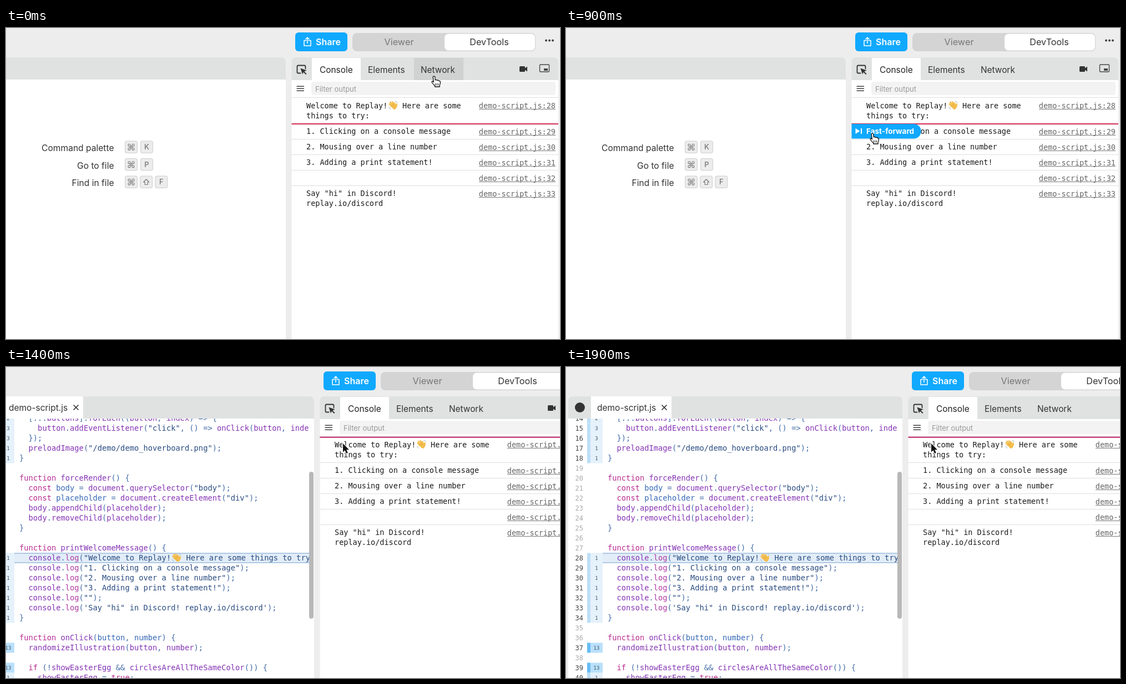
An HTML page with a canvas that plays this animation: 998 px wide and 561 px high, repeating every 2000 ms.

```html
<!DOCTYPE html>
<html lang="en">
<head>
<meta charset="utf-8">
<title>Console rewind</title>
<style>
html, body { margin: 0; width: 100%; height: 100%; overflow: hidden; background: #ededed; }
canvas { display: block; width: 998px; height: 561px; }
</style>
</head>
<body>
<canvas id="stage" width="998" height="561"></canvas>
<script>
const ctx = document.getElementById("stage").getContext("2d");
const LOOP = 2000, STEP = 100, JUMP = 1300;
const SANS = "Inter, 'Open Sans', sans-serif";
const MONO = "'DejaVu Sans Mono', 'Noto Sans Mono', monospace";
const BLUE = "#10a9ff", BAR = "#e0e2e2", LINE = "#dcdedf";

// Pointer tip at each step
const path = [
  [771, 87], [768, 132], [748, 225], [730, 293], [722, 306], [664, 274], [575, 237],
  [535, 219], [546, 212], [552, 190], [555, 163], [556, 146], [556, 139]
];
const pan = [1, 51, 100.5, 101, 101.5, 101.5, 102];

const rows = [
  { y: 126, no: 28, text: ["Welcome to Replay!👋 Here are some", "things to try:"] },
  { y: 173, no: 29, text: ["1. Clicking on a console message"] },
  { y: 201, no: 30, text: ["2. Mousing over a line number"] },
  { y: 229, no: 31, text: ["3. Adding a print statement!"] },
  { y: 257, no: 32, text: [] },
  { y: 285, no: 33, text: ['Say "hi" in Discord!', "replay.io/discord"] }
];

const code = `  [...buttons].forEach((button, index) => {
    button.addEventListener("click", () => onClick(button, index));
  });
  preloadImage("/demo/demo_hoverboard.png");
}

function forceRender() {
  const body = document.querySelector("body");
  const placeholder = document.createElement("div");
  body.appendChild(placeholder);
  body.removeChild(placeholder);
}

function printWelcomeMessage() {
  console.log("Welcome to Replay!👋 Here are some things to try:");
  console.log("1. Clicking on a console message");
  console.log("2. Mousing over a line number");
  console.log("3. Adding a print statement!");
  console.log("");
  console.log('Say "hi" in Discord! replay.io/discord');
}

function onClick(button, number) {
  randomizeIllustration(button, number);

  if (!showEasterEgg && circlesAreAllTheSameColor()) {
    showEasterEgg = true;`.split("\n");

function hits(no) {
  if (no === 14) return 2;
  if (no === 15 || no === 16) return 3;
  if (no === 37 || no === 39) return 13;
  return no < 19 || (no > 27 && no < 35) || no === 40 ? 1 : 0;
}

function rect(x, y, w, h, color) {
  ctx.fillStyle = color;
  ctx.fillRect(x, y, w, h);
}

function round(x, y, w, h, r, color) {
  ctx.beginPath();
  ctx.roundRect(x, y, w, h, r);
  ctx.fillStyle = color;
  ctx.fill();
}

function shape(d, x, y, fill, stroke, width = 1) {
  const p = new Path2D(d);
  ctx.save();
  ctx.translate(x, y);
  ctx.lineJoin = ctx.lineCap = "round";
  ctx.lineWidth = width;
  if (fill) { ctx.fillStyle = fill; ctx.fill(p); }
  if (stroke) { ctx.strokeStyle = stroke; ctx.stroke(p); }
  ctx.restore();
}

function label(str, x, y, size, color, weight = 400, align = "left", family = SANS) {
  ctx.font = `${weight} ${size}px ${family}`;
  ctx.textAlign = align;
  ctx.fillStyle = color;
  ctx.fillText(str, x, y);
}

function wave(x, y) {
  shape("M6 11 L2.5 6.5 M8 9 L4 3.5 M10.5 8 L7.5 2.8 M12.5 8.5 L11 4.5 M13.5 13 Q16 10 15.2 6.8",
    x, y, null, "#f3bd4d", 2.7);
  shape("M5 10 L12.5 6.5 L15 10 Q16 15 12 16.5 Q9 17 5 10Z", x, y, "#f3bd4d");
  shape("M6.2 8.5 L8 10.5 M8.6 7.2 L10 9.2", x, y, null, "#d8942f", .7);
  shape("M1.5 12 Q2 15 4.5 16 M13.2 1.5 Q16 2 16.8 4.5", x, y, null, "#9db4c0", 1);
}

// Draws monospaced text with the waving hand inline; returns the end x
function mono(str, x, y, size, color) {
  str.split("👋").forEach((part, i) => {
    if (i) {
      wave(x + 1, y - 14);
      x += size * 1.38;
    }
    label(part, x, y, size, color, 400, "left", MONO);
    x += ctx.measureText(part).width;
  });
  return x;
}

function drawCodeLine(text, x, y) {
  const token = /("[^"]*"|'[^']*')|\b(function|const|if|true)\b|(\w+)|([^\w"']+)/g;
  const isDecl = text.startsWith("function");
  let before = "", open = false;
  for (const [s, str, key, name] of text.matchAll(token)) {
    let color = "#426ca8";
    if (str) color = "#294b80";
    else if (key) color = "#b92b91";
    else if (name) {
      color = before.trim() === "const" || (isDecl && open) ? "#3568b5" : "#8534b4";
      if (name === "log") color = "#b13ba5";
    }
    x = mono(s, x, y, 13.75, color);
    if (s.trim()) before = s;
    open = open || s.includes("(");
  }
}

function drawEditor() {
  round(-98, 53, 602, 520, 8, BAR);
  rect(-98, 93, 602, 468, "#fff");
  ctx.beginPath();
  ctx.arc(-77, 73, 9, 0, 7);
  ctx.fillStyle = "#333";
  ctx.fill();
  rect(-57, 53, 145, 41, "#fff");
  label("demo-script.js", -46, 78.5, 15.5, "#333");
  shape("M0 0 L8 8 M8 0 L0 8", 71, 69, null, "#333", 1.7);

  ctx.save();
  ctx.beginPath();
  ctx.rect(-98, 93, 593, 468);
  ctx.clip();
  code.forEach((text, i) => {
    const no = 14 + i, mid = 92.5 + i * 18, n = hits(no);
    label(no, -71, mid + 4.5, 12, n ? "#444" : "#aaa", 400, "right", MONO);
    if (n) {
      const hot = n > 9;
      rect(-64, mid - 9, 6, 18, hot ? "#67bcf4" : "#bcdff7");
      rect(-58, mid - 9, 22, 18, hot ? "#b9e0fb" : "#e5f1fb");
      label(n, -47, mid + 3, 9, "#456", 400, "center", MONO);
    }
    if (no === 28) {
      rect(-36, mid - 9, 531, 18, "#e2edf8");
      rect(-36, mid - 9, 531, 1, "#78a3d1");
      rect(-36, mid + 8, 531, 1, "#78a3d1");
    }
    drawCodeLine(text, -27, mid + 4.5);
  });
  ctx.restore();
  round(495, 189, 8, 265, 4, "#b8b8b8");
}

function keyCap(x, y, key) {
  round(x, y, 23, 22.5, 4, "#cfcfcf");
  round(x + 1, y + 1, 21, 20.5, 3, "#ececec");
  if (key === "cmd") {
    shape("M4 4 H7 V7 H4Z M4 4 H2 A2 2 0 1 1 4 2Z M7 4 V2 A2 2 0 1 1 9 4Z M7 7 H9 A2 2 0 1 1 7 9Z M4 7 V9 A2 2 0 1 1 2 7Z",
      x + 6, y + 5.7, null, "#777", 1.1);
  } else if (key === "shift") {
    shape("M5 0 L10 5 H7.5 V9.5 H2.5 V5 H0Z", x + 6.5, y + 6.5, null, "#777", 1.2);
  } else {
    label(key, x + 11.5, y + 15.5, 13, "#777", 500, "center");
  }
}

function drawPalette() {
  round(-98, 53, 602, 520, 8, BAR);
  rect(-98, 93, 602, 468, "#fff");
  [["Command palette", "cmd", "K"], ["Go to file", "cmd", "P"], ["Find in file", "cmd", "shift", "F"]]
    .forEach(([name, ...keys], i) => {
      const y = 203.5 + i * 31.5;
      label(name, 194.5, y + 18.5, 15.6, "#333", 400, "right");
      keys.forEach((k, j) => keyCap(214 + j * (keys.length > 2 ? 27.2 : 28), y, k));
    });
}

function drawHeader() {
  round(521, 8, 94, 34, 6, BLUE);
  shape("M4 5.5 H0 V15 H12 V5.5 H8 M6 10.5 V0 M3 3 L6 0 L9 3", 537, 17, null, "#fff", 1.5);
  label("Share", 558, 30.5, 16, "#fff", 600);
  round(624, 9, 330, 33, 8, "#d4d4d4");
  round(790, 10.5, 163, 30, 7, "#fff");
  label("Viewer", 708, 31, 16.3, "#777", 400, "center");
  label("DevTools", 870.5, 31, 16.2, "#333", 400, "center");
  for (let i = 0; i < 3; i++) round(971 + i * 6, 20.5, 4, 4, 2, "#444");
}

function drawTabs(hoverNetwork) {
  round(514.5, 53, 480.5, 520, 8, BAR);
  rect(514.5, 94, 480.5, 467, "#fff");
  rect(551, 54, 88, 40, "#fff");
  if (hoverNetwork) rect(735, 54, 89, 40, "#d0d2d2");
  shape("M6 14 H2 Q0 14 0 12 V2 Q0 0 2 0 H13 Q15 0 15 2 V6", 524.5, 67.5, null, "#333", 1.8);
  shape("M0 0 L11 4 L6.8 6 L11 10 L9.5 11.5 L5.3 7.3 L3.5 11Z", 530.5, 72.5, "#333");
  label("Console", 565, 80.5, 15.4, "#222");
  label("Elements", 652, 80.5, 15.4, "#333");
  label("Network", 747, 80.5, 15.4, "#333");
  round(925, 69, 10, 10, 1.5, "#333");
  shape("M0 3 L4 0 V9 L0 6Z", 935, 69.5, "#333");
  shape("M1.5 0 H15.5 Q17 0 17 1.5 V11.5 Q17 13 15.5 13 H1.5 Q0 13 0 11.5 V1.5 Q0 0 1.5 0Z",
    961.5, 66, null, "#444", 1.4);
  rect(969, 73, 7, 4, "#444");

  for (let i = 0; i < 3; i++) rect(523.5, 104.5 + i * 4, 13.5, 1.4, "#333");
  round(550, 97, 440, 24, 4, "#f3f3f3");
  label("Filter output", 557, 114.5, 13, "#999");
  rect(514.5, 125, 480.5, 1, LINE);
}

function drawRows(rewound) {
  rows.forEach((row, i) => {
    if (i) rect(514.5, row.y - 1, 480.5, 1, LINE);
    row.text.forEach((s, j) => mono(s, 541, row.y + 18.5 + j * 18 - (i ? .5 : 0), 13.5, "#1c1c1c"));
    const base = row.y + 18.5;
    label("demo-script.js:" + row.no, 990, base, 13.5, "#666", 400, "right", MONO);
    rect(852, base + 1.5, 138, 1, "#777");
  });
  if (rewound) rect(514.5, 125.5, 480.5, 2.5, "#c9497f");
  else rect(514.5, 172, 480.5, 2, "#d32f55");
}

function drawSeek(row, open) {
  const back = row === rows[0];
  const text = back ? "Rewind" : "Fast-forward";
  ctx.font = `700 13.5px ${SANS}`;
  const w = open ? 39 + ctx.measureText(text).width : 26.5;
  round(514.5, row.y, w, 26.5, [0, 13, 13, 0], BLUE);
  const tri = back ? "M11 0 V10 L3.5 5Z" : "M0 0 V10 L8 5Z";
  shape(tri, 521.5, row.y + 8, "#fff");
  rect(back ? 521.5 : 531, row.y + 8, 2, 10, "#fff");
  if (open) label(text, 541, row.y + 18, 13.5, "#fff", 700);
}

function drawPointer(x, y, hand) {
  if (hand) {
    shape("M-1.8 1.5 Q-1.6 -.2 0 0 Q1.6 0 1.8 1.6 L2.3 7 Q4.5 5.4 5.5 7.5 Q7.6 6.4 8.6 8.5 Q11 7.8 11.4 10.2 Q11.8 13 10.2 16 V19 H1.6 V17.2 Q-1.4 14.6 -3.8 11 Q-4.3 9 -2.6 9 Q-1.4 9.3 -.6 10.7Z",
      x, y, "#fff", "#111", 1.3);
    shape("M2.4 13 V16.4 M5 13 V16.4 M7.6 13 V16.4", x, y, null, "#222", 1);
  } else {
    shape("M0 0 V15.5 L3.5 12.3 L6 18 L8.8 16.8 L6.3 11.3 H11Z", x, y, "#111", "#fff", 2);
    shape("M0 0 V15.5 L3.5 12.3 L6 18 L8.8 16.8 L6.3 11.3 H11Z", x, y, "#111");
  }
}

function draw(now) {
  const step = Math.floor((now % LOOP) / STEP);
  const t = step * STEP, rewound = t >= JUMP;
  rect(0, 0, 998, 561, "#ededed");
  ctx.save();
  if (rewound) ctx.translate(pan[step - JUMP / STEP], 0);
  drawHeader();
  rewound ? drawEditor() : drawPalette();
  drawTabs(step === 0);
  drawRows(rewound);
  if (rewound) {
    drawPointer(556, 138, false);
  } else {
    const [x, y] = path[step];
    const row = rows.findLast(r => y >= r.y - 1);
    const open = t >= 800;
    if (row) drawSeek(row, open);
    drawPointer(x, y, step === 0 || open || x < 541);
  }
  ctx.restore();
}

const start = performance.now();
function tick() {
  draw(performance.now() - start);
  requestAnimationFrame(tick);
}
tick();
</script>
</body>
</html>
```
